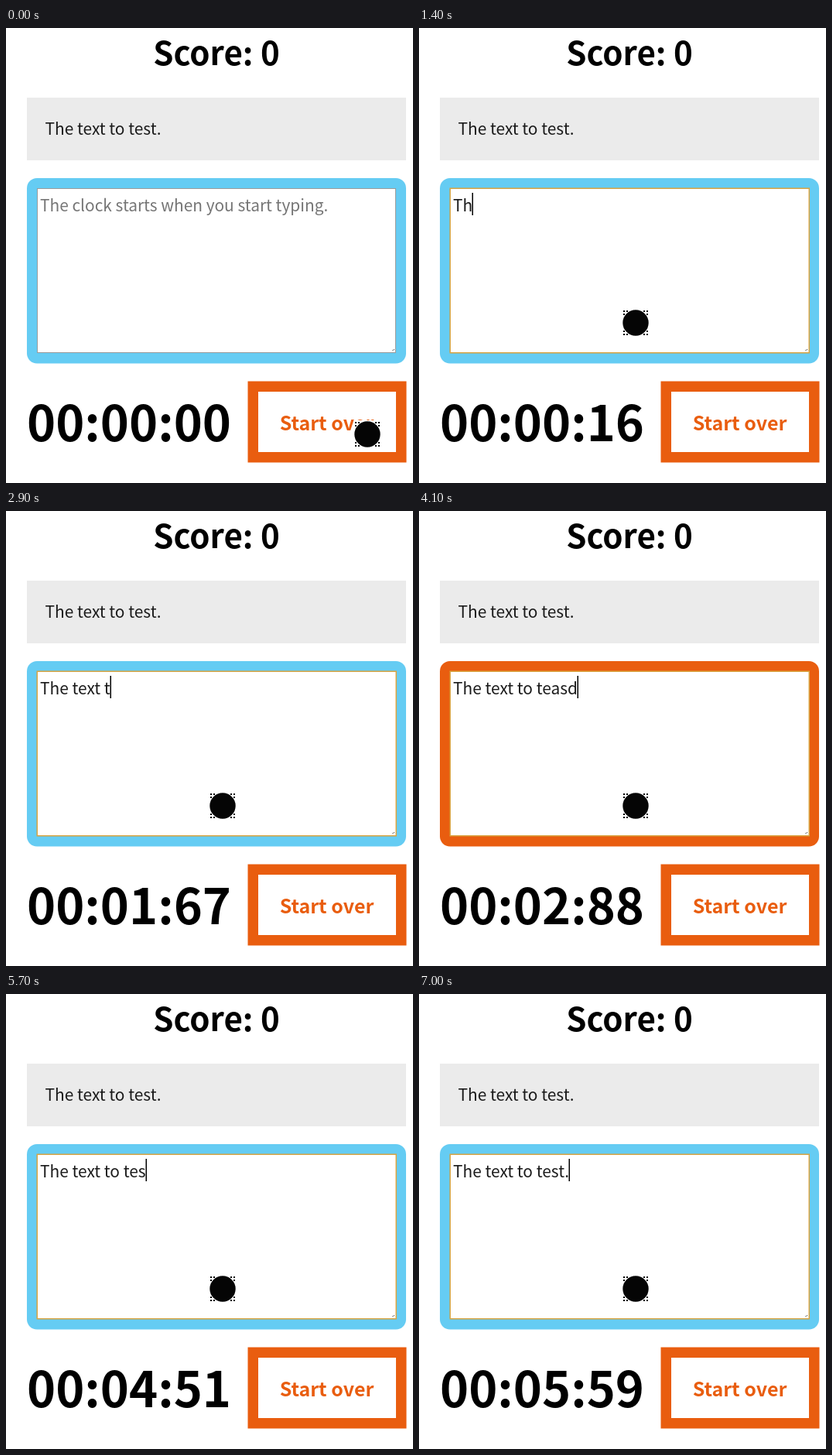
Write an HTML page with a canvas that moves like this. It is 526x588 px and loops after 7100 ms.

```html
<!DOCTYPE html>
<html lang="en">
<head>
<meta charset="utf-8">
<title>Typing test</title>
<style>
  html, body { margin: 0; width: 100%; height: 100%; overflow: hidden; background: #fff; }
  canvas { display: block; }
</style>
</head>
<body>
<canvas id="stage" width="526" height="588"></canvas>
<script>
const ctx = document.getElementById('stage').getContext('2d');
const LOOP = 7100, FRAME = 100;
const BLUE = '#65ccf3', ORANGE = '#e95d0f';
const FAMILY = '"Noto Sans CJK SC", "Noto Sans CJK JP", "Noto Sans", sans-serif';
const BODY = `300 20.9px ${FAMILY}`;
const bold = size => `700 ${size}px ${FAMILY}`;

const GOAL = 'The text to test.';
const FOCUS_AT = 600;

// Each key press: [time, key], where '<' deletes one character.
const KEYS = [
  [1230, 'T'], [1400, 'h'], [1560, 'e'], [1720, ' '],
  [1920, 't'], [2090, 'e'], [2270, 'x'], [2450, 't'], [2680, ' '],
  [2870, 't'], [3030, 'o'], [3190, ' '], [3360, 't'], [3530, 'e'],
  [3780, 'a'], [3920, 's'], [4060, 'd'],
  [4560, '<'], [4720, '<'], [4880, '<'], [5060, '<'],
  [5360, 'e'], [5560, 's'], [6200, 't'], [6760, '.']
];
// Stopwatch: [time, hundredths]
const CLOCK = [[1234, 0], [1800, 57.2], [2900, 167.5], [4400, 318.5], [5700, 451.5], [6760, 559]];
const POINTER = { from: [467, 525], to: [280, 381], start: 30, end: 530 };

function typedAt(t) {
  let text = '', last = FOCUS_AT;
  for (const [time, key] of KEYS) {
    if (time > t) break;
    text = key === '<' ? text.slice(0, -1) : text + key;
    last = time;
  }
  return { text, last };
}

function interpolate(points, t) {
  if (t <= points[0][0]) return points[0][1];
  for (let i = 1; i < points.length; i++) {
    const [t0, v0] = points[i - 1], [t1, v1] = points[i];
    if (t <= t1) return v0 + (v1 - v0) * (t - t0) / (t1 - t0);
  }
  return points[points.length - 1][1];
}

function clockText(t) {
  const n = Math.floor(interpolate(CLOCK, t));
  return [n / 6000, n / 100 % 60, n % 100]
    .map(v => String(Math.floor(v)).padStart(2, '0')).join(':');
}

function rect(x, y, w, h, color) {
  ctx.fillStyle = color;
  ctx.fillRect(x, y, w, h);
}

function label(text, x, y, font, color = '#000', align = 'left') {
  ctx.font = font;
  ctx.fillStyle = color;
  ctx.textAlign = align;
  ctx.fillText(text, x, y);
}

function drawEditor(t) {
  const { text, last } = typedAt(t);
  const focused = t >= FOCUS_AT;

  ctx.fillStyle = GOAL.startsWith(text) ? BLUE : ORANGE;
  ctx.beginPath();
  ctx.roundRect(27, 194, 490, 239.5, 13);
  ctx.fill();
  if (focused) {
    rect(39.5, 206.5, 465.5, 214, '#d9a441');
    rect(41, 208, 462.5, 211, '#fff');
  } else {
    rect(40, 207, 464, 213, '#9a9a9a');
    rect(41, 208, 462, 211, '#fff');
  }
  rect(501, 415, 1, 1, '#555');
  rect(499, 416, 2, 1, '#999');

  if (text) label(text, 44, 236.5, BODY, '#1a1a1a');
  else label('The clock starts when you start typing.', 44, 236.5, BODY, '#757575');

  if (focused && (t - last) % 1000 < 500) {
    ctx.font = BODY;
    rect(Math.round(44 + ctx.measureText(text).width) - 0.5, 213, 1.5, 29, '#000');
  }
}

function drawPointer(t) {
  const { from, to, start, end } = POINTER;
  const p = Math.min(1, Math.max(0, (t - start) / (end - start)));
  const ease = p * p * (3 - 2 * p);
  const [x, y] = from.map((v, i) => Math.round(v + (to[i] - v) * ease));
  rect(x - 18, y - 18, 36, 36, '#fff');
  ctx.fillStyle = '#050505';
  ctx.beginPath();
  ctx.arc(x, y, 16.7, 0, Math.PI * 2);
  ctx.fill();
  // Pixelated fringe at the four corners
  for (const sx of [-1, 1]) for (const sy of [-1, 1])
    for (const [dx, dy] of [[15, 11], [11, 15], [15, 15]])
      ctx.fillRect(x + sx * dx - 1, y + sy * dy - 1, 2, 2);
}

function draw(t) {
  rect(0, 0, 526, 588, '#fff');
  label('Score: 0', 272, 48, bold(42), '#000', 'center');
  rect(27, 90, 490, 81, '#ebebeb');
  label(GOAL, 50.5, 138, BODY, '#1a1a1a');
  drawEditor(t);
  label(clockText(t), 27, 534, bold(63));
  rect(312.5, 456.5, 205, 105, ORANGE);
  rect(326, 470, 178, 78, '#fff');
  label('Start over', 414.5, 520, bold(25), ORANGE, 'center');
  drawPointer(t);
}

function tick() {
  const t = performance.now() % LOOP;
  draw(Math.floor(t / FRAME) * FRAME);
  requestAnimationFrame(tick);
}
tick();
</script>
</body>
</html>
```
